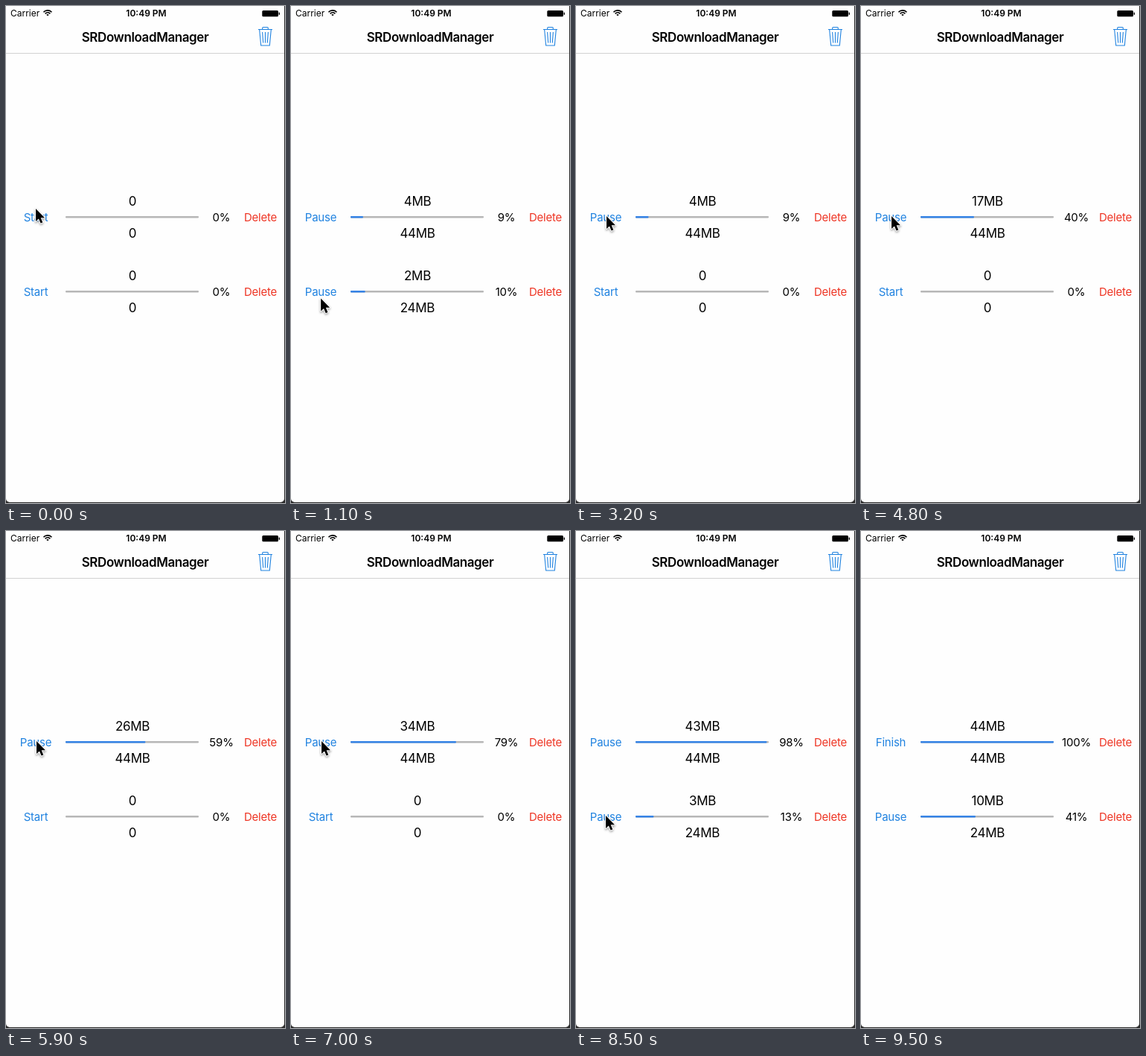
An HTML page with a canvas that plays this animation: 375 px wide and 667 px high, repeating every 9.6 s.

```html
<!DOCTYPE html>
<html lang="en">
<head>
<meta charset="utf-8">
<title>SRDownloadManager</title>
<style>
html, body { margin: 0; width: 100%; height: 100%; overflow: hidden; background: #fff; }
canvas { display: block; }
</style>
</head>
<body>
<canvas id="stage" width="375" height="667"></canvas>
<script>
const ctx = document.getElementById('stage').getContext('2d');
const BLUE = '#2183e0', RED = '#ee3524', BLACK = '#000', BAR = '#3583e6';

// All times are in seconds.
const LOOP = 9.6, STEP = 0.1, RESET = 2.5, POINTER_END = 9.4;

// Each row runs once before the reset and once after it.
const first = { y: 283, total: 44.05, rate: 0.2059, power: 0.932, slowdown: 0.7, runs: [[0.35, 2], [2.75, LOOP]] };
const second = { y: 383, total: 24.7, rate: 0.2584, power: 1.07, slowdown: 0, runs: [[0.65, 1.7], [7.95, LOOP]] };
first.other = second;
second.other = first;

const home = { x: 40, y: 272 };
const firstButton = { x: 41, y: 282 };
const secondButton = { x: 40, y: 382 };
const below = { x: 42, y: 477 };
const trash = { x: 346, y: 38 };
const moves = [
  { from: 0.2, to: 0.6, goal: secondButton },
  { from: 1.0, to: 1.3, goal: below },
  { from: 1.3, to: 1.5, goal: secondButton },
  { from: 1.7, to: 1.9, goal: firstButton },
  { from: 2.1, to: 2.4, goal: trash },
  { from: 2.5, to: 2.7, goal: firstButton },
  { from: 7.3, to: 7.7, goal: secondButton }
];

const clamp01 = v => Math.min(1, Math.max(0, v));

function pointerAt(t) {
  let { x, y } = home;
  for (const { from, to, goal } of moves) {
    const u = clamp01((t - from) / (to - from));
    x += (goal.x - x) * u ** 2.5;
    y += (goal.y - y) * u ** 2;
  }
  return { x, y };
}

// A download loses speed while the other one shares the connection.
function download(row, t) {
  const session = t < RESET ? 0 : 1;
  const [start, stop] = row.runs[session];
  const [otherStart, otherStop] = row.other.runs[session];
  const end = Math.min(t, stop);
  const alone = Math.max(0, end - start);
  const shared = Math.max(0, Math.min(end, otherStop) - Math.max(start, otherStart));
  const progress = clamp01(row.rate * (alone - row.slowdown * shared) ** row.power);
  let label = 'Start';
  if (progress === 1) label = 'Finish';
  else if (t >= start) label = t < stop ? 'Pause' : 'Resume';
  return { progress, label };
}

function text(str, x, y, size, color = BLACK, { weight = 400, align = 'center', spacing = 0 } = {}) {
  ctx.font = `${weight} ${size}px Inter, sans-serif`;
  ctx.letterSpacing = spacing + 'px';
  ctx.textAlign = align;
  ctx.fillStyle = color;
  ctx.fillText(str, x, y);
}

function box(x, y, w, h, r, color) {
  ctx.fillStyle = color;
  ctx.beginPath();
  ctx.roundRect(x, y, w, h, r);
  ctx.fill();
}

function drawStatusBar() {
  text('Carrier', 6, 14, 12, BLACK, { align: 'left' });
  text('10:49 PM', 188.5, 14, 12, BLACK, { weight: 600 });

  ctx.strokeStyle = BLACK;
  ctx.lineWidth = 1.6;
  for (const r of [1.6, 4.6, 7.6]) {
    ctx.beginPath();
    ctx.arc(56, 13.5, r, -Math.PI * 0.76, -Math.PI * 0.24);
    ctx.stroke();
  }

  box(344.3, 6, 21.7, 8.3, 1.5, BLACK);
  box(366.7, 8.5, 1.3, 3.4, 0.6, BLACK);
}

function drawTrash() {
  const cx = 348.5;
  ctx.strokeStyle = BLUE;
  ctx.lineWidth = 1.1;
  ctx.beginPath();
  ctx.moveTo(cx - 9.5, 31.5);
  ctx.lineTo(cx + 9.5, 31.5);
  ctx.roundRect(cx - 3.8, 28.5, 7.6, 3, 1);
  ctx.moveTo(cx - 7.8, 32);
  ctx.lineTo(cx - 5.8, 53);
  ctx.lineTo(cx + 5.8, 53);
  ctx.lineTo(cx + 7.8, 32);
  for (const side of [-1, 0, 1]) {
    ctx.moveTo(cx + side * 3.9, 35);
    ctx.lineTo(cx + side * 2.8, 49.5);
  }
  ctx.stroke();
}

function drawRow(row, t) {
  const { y, total } = row;
  const { progress, label } = download(row, t);
  const megabytes = n => progress > 0 ? Math.floor(n) + 'MB' : '0';
  const large = { spacing: -0.3 }, small = { spacing: -0.22 };

  text(megabytes(total * progress), 170, y - 15, 17, BLACK, large);
  text(megabytes(total), 170, y + 27.5, 17, BLACK, large);
  text(label, 40, y + 6, 15, BLUE, small);
  text(Math.floor(progress * 100) + '%', 289.5, y + 6, 15, BLACK, small);
  text('Delete', 342, y + 6, 15, RED, small);

  box(80, y - 1, 179, 2.4, 1, '#b7b7b7');
  if (progress > 0) box(80, y - 1, 179 * progress, 2.4, 1, BAR);
}

function drawPointer({ x, y }) {
  ctx.save();
  ctx.translate(x, y);
  const arrow = new Path2D('M0 0V17L3.9 13.4 6.6 19.6 9.3 18.4 6.7 12.3H12Z');
  ctx.lineJoin = 'round';
  ctx.lineWidth = 2;
  ctx.strokeStyle = '#fff';
  ctx.shadowColor = 'rgba(0,0,0,.4)';
  ctx.shadowBlur = 3;
  ctx.shadowOffsetY = 1.5;
  ctx.stroke(arrow);
  ctx.shadowColor = 'transparent';
  ctx.fillStyle = BLACK;
  ctx.fill(arrow);
  ctx.restore();
}

function draw(t) {
  ctx.fillStyle = '#2b2b2b';
  ctx.fillRect(0, 0, 375, 667);
  box(0, 0, 374, 666, [0, 0, 5, 5], '#fefefe');
  ctx.fillStyle = '#d2d2d2';
  ctx.fillRect(0, 63, 374, 1);

  drawStatusBar();
  text('SRDownloadManager', 187, 48, 17, BLACK, { weight: 600, spacing: -0.41 });
  drawTrash();
  drawRow(first, t);
  drawRow(second, t);
  if (t < POINTER_END) drawPointer(pointerAt(t));
}

const begin = performance.now();
function tick() {
  const t = (performance.now() - begin) / 1000 % LOOP;
  draw(Math.floor(t / STEP) * STEP);
  requestAnimationFrame(tick);
}
tick();
</script>
</body>
</html>
```
